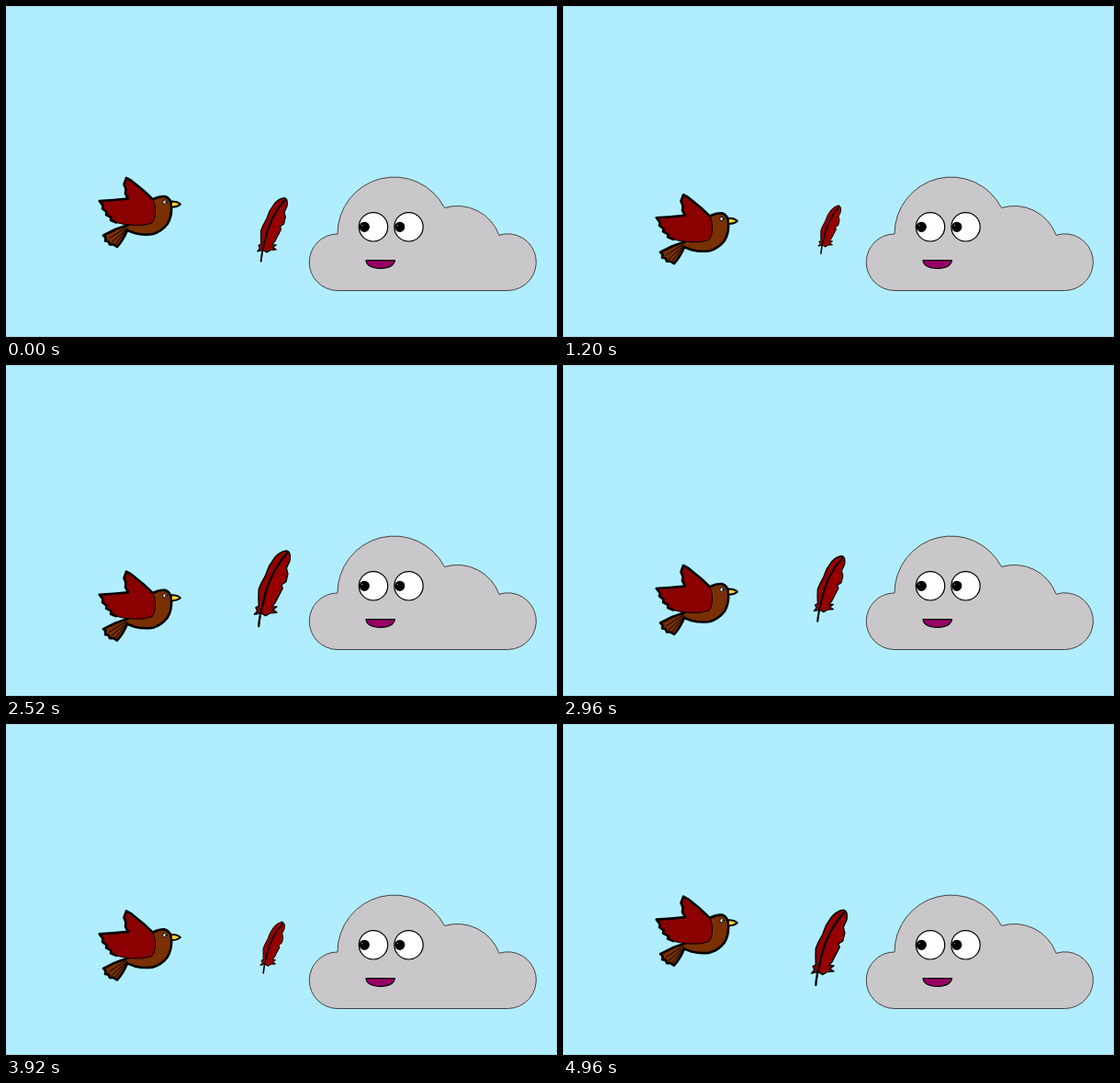
Recreate the animation shown at these times as an HTML page. Size 600 by 360 pixels, loop 5 s.

```html
<!DOCTYPE html>
<html lang="en">
<head>
<meta charset="utf-8">
<title>Bird, feather and cloud</title>
<style>
  html, body { margin: 0; width: 100%; height: 100%; overflow: hidden; background: #b0eeff; }
  svg { display: block; width: 100%; height: 100%; }
</style>
</head>
<body>
<svg viewBox="0 0 600 360" stroke="#000" stroke-linejoin="round" stroke-linecap="round">
  <rect x=".5" y=".5" width="599" height="359" fill="#b0eeff" stroke="#a4d8e6"/>

  <g id="bird" stroke-width="2.6">
    <path fill="#7a3000" d="M159 211Q165 207 173 207Q179.500 209 180 217Q181 229 175.500 237.500Q169 245.500 160 248Q150 249.500 140 247L132 244
      Q128 254 121 262L117 259.500L113 259.500L111.500 256L108 255.500L108.500 252L106 249.500L119 243L133 238Z"/>
    <path fill="none" stroke-width="1" d="M131 241L112 253M132 242L115 257M132 243L119 259"/>
    <path fill="#ffd21f" stroke-width="1.800" d="M180 212.500Q187 212.500 190 215.700Q186 218.800 180 218.700Z"/>
    <path id="wing" fill="#8b0000" stroke-width="1" d="M120 235.500L114 233L114.500 230L109 227L109.500 224L105 220.500L105.500 217L101.700 212
      Q117 211.300 133 209.500L130 204L130.500 199L128.500 194L131 187L136.500 190L142 194.500L150 201L159 209.500
      Q162 213 162.500 221Q163 231 159 236Q150 239.500 139 238.500Q128 238 120 235.500Z"/>
    <!-- heavy line along the free edge of the wing only -->
    <use href="#wing" id="wingEdge"/>
    <circle cx="173" cy="213.200" r="2.200" fill="#fff" stroke-width="1"/>
    <circle cx="173.700" cy="213.200" r=".8" stroke="none"/>
  </g>

  <g id="feather" stroke-width="1.200">
    <path fill="#960000" d="M303 208.700Q307.500 209.500 306 218L303 224.500L304.300 229.700L302.600 237L298.500 239.700L299.500 243L296 249.700L292.500 256.400
      L290 259.500L294.300 259.800L290.500 262.500L294.300 265L288 265.500L284 268L280 265.500L273.700 266.800L276.500 263.500L275 260.500L277.800 259
      L277.500 252L277.700 244L280 238.500L284 231L287.300 222.500L292.300 215Q297 209.500 303 208.700Z"/>
    <path fill="none" stroke-width="2" d="M303.500 211Q287 230 282 255Q278.500 268 277.700 277.500"/>
  </g>

  <path fill="#c9c7ca" stroke="#444" d="M360.500 309.500A30.500 30.750 0 0 1 361 248A61.700 61.900 0 0 1 477.500 219.500
    A48.500 48.500 0 0 1 537 249.300A30.850 30.850 0 1 1 547 309.500Z"/>
  <g stroke-width="1.200">
    <g id="eye">
      <circle cx="400" cy="240.300" r="15.700" fill="#fff"/>
      <circle cx="390.300" cy="240.300" r="5"/>
      <circle cx="387.900" cy="238.600" r=".9" fill="#666" stroke="none"/>
    </g>
    <use href="#eye" x="38.500"/>
    <path fill="#990066" d="M392 276.700H423.500Q422 285 408 285.300Q393 285 392 276.700Z"/>
  </g>
</svg>
<script>
  const LOOP = 5000, LEG = LOOP / 4;
  const SCALES = [1, .75, 1.2, .75, 1.2];
  const get = id => document.getElementById(id);
  const bird = get('bird'), feather = get('feather');
  const start = performance.now();

  // Trace the wing outline from its lower left corner up to the shoulder.
  const outline = get('wing').getAttribute('d').replace(/9\.500\s+Q162 213[\s\S]*/, '9.5');
  const edge = document.createElementNS('http://www.w3.org/2000/svg', 'path');
  edge.setAttribute('d', outline);
  edge.setAttribute('fill', 'none');
  get('wingEdge').replaceWith(edge);

  function draw(now) {
    const t = Math.max(0, now - start) % LOOP;
    const drop = 38 * (1 - Math.abs(t / (LOOP / 2) - 1));
    bird.setAttribute('transform', `translate(0 ${drop})`);

    const leg = Math.floor(t / LEG), part = t / LEG - leg;
    const scale = SCALES[leg] + (SCALES[leg + 1] - SCALES[leg]) * part;
    feather.setAttribute('transform', `translate(290.8 243.3) scale(${scale}) translate(-290.8 -243.3)`);
    requestAnimationFrame(draw);
  }
  draw(start);
</script>
</body>
</html>
```
